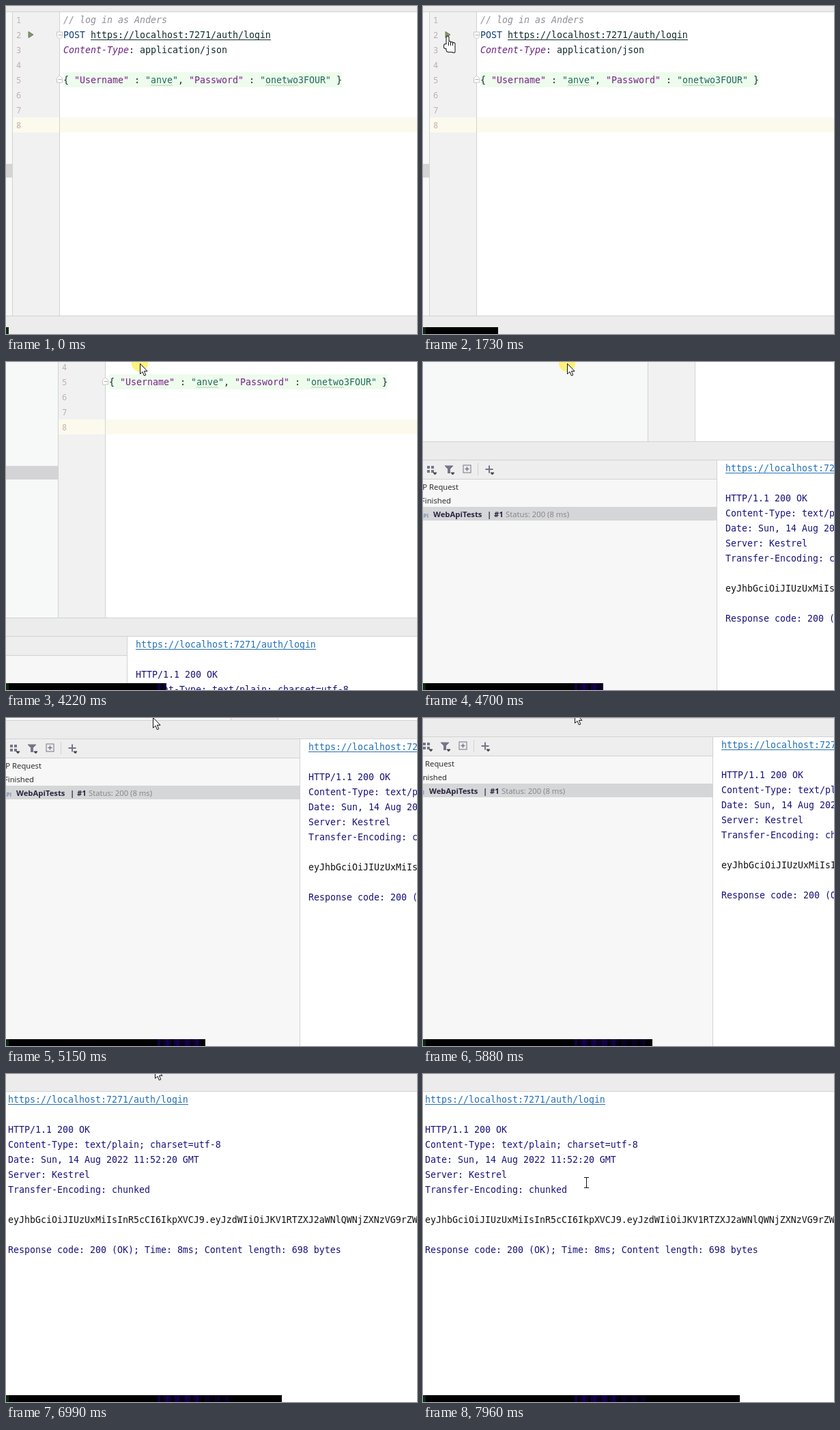
These frames come from a looping animation (602x480 px, 8000 ms). An HTML page with a canvas:

```html
<!DOCTYPE html>
<html lang="en">
<head>
<meta charset="utf-8">
<title>HTTP request</title>
<style>
  html, body { margin: 0; width: 100%; height: 100%; overflow: hidden; background: #fff; }
  canvas { display: block; }
</style>
</head>
<body>
<canvas id="stage" width="602" height="480"></canvas>
<script>
const ctx = document.getElementById('stage').getContext('2d');
const W = 602, H = 480, LOOP = 8000;

// Scene layout; the view pans over it
const LEFT = -700, WIDE = 1900, ROW = 22, CHAR = 8;
const GUTTER = 9, CODE = 78, TEXT = 84;
const BAR = 453, PANEL = 480, TOOLS = 28, SPLIT = 110, RESPONSE = 123;

const MONO = '13.29px "DejaVu Sans Mono", "Noto Sans Mono", monospace';
const ITALIC = 'italic ' + MONO;
const UI = '11.3px "Open Sans", "Noto Sans", sans-serif';
const NAVY = '#17127a', PURPLE = '#7a1f8c', GREEN = '#1f6a5a', DARK = '#122b2b', LINK = '#2470b8';
const EDGE = '#d2d2d2', CHROME = '#ececec', ICON = '#75758a';

const clamp = p => Math.min(1, Math.max(0, p));
const smooth = p => p * p * (3 - 2 * p);
const easeOut = p => Math.sin(p * Math.PI / 2);
const progress = (t, start, duration) => clamp((t - start) / duration);
const rowY = n => n * ROW - 2;

function rect(x, y, w, h, color) {
  ctx.fillStyle = color;
  ctx.fillRect(x, y, w, h);
}

function text(str, x, middle, color, font = MONO, align = 'left') {
  ctx.font = font;
  ctx.textAlign = align;
  ctx.fillStyle = color;
  ctx.fillText(str, x, middle + 5);
}

// Consecutive coloured pieces on the character grid
function pieces(x, middle, ...parts) {
  for (const [str, color, font] of parts) {
    text(str, x, middle, color, font);
    x += str.length * CHAR;
  }
}

function underlined(str, x, middle, color) {
  text(str, x, middle, color);
  rect(x, middle + 7, str.length * CHAR, 1, color);
}

function polygon(points, fill, stroke = fill) {
  ctx.beginPath();
  for (const [x, y] of points) ctx.lineTo(x, y);
  ctx.closePath();
  ctx.fillStyle = fill;
  ctx.fill();
  ctx.strokeStyle = stroke;
  ctx.lineWidth = 1;
  ctx.stroke();
}

function plus(x, y, size, thick) {
  rect(x - size / 2, y - thick / 2, size, thick, ICON);
  rect(x - thick / 2, y - size / 2, thick, size, ICON);
}

function wave(x, y, width) {
  ctx.beginPath();
  for (let i = 0; i <= width; i++) ctx.lineTo(x + i, y + Math.cos(i * Math.PI / 2));
  ctx.strokeStyle = '#a9cfa4';
  ctx.lineWidth = 0.9;
  ctx.stroke();
}

function foldMark(y, dir) {
  const x = CODE + 0.5, flat = y - 4.5 * dir, bend = y + 2 * dir;
  polygon([[x - 4, flat], [x + 4, flat], [x + 4, bend], [x, y + 6 * dir], [x - 4, bend]], '#fff', '#c4c4c4');
  rect(x - 2, y - 0.5, 5, 1, '#aaa');
}

function drawEditor() {
  rect(LEFT, 8, GUTTER - LEFT, BAR, '#f7f8f8');
  rect(LEFT, 231, GUTTER - LEFT, 20, '#d4d4d7');
  rect(GUTTER, 8, CODE - GUTTER, BAR, '#f1f1f1');
  rect(GUTTER, rowY(8) - 11, WIDE, ROW, '#fcfaed');
  rect(TEXT, rowY(5) - 11, 51 * CHAR, ROW, '#edfcec');
  rect(GUTTER, 8, 1, BAR, EDGE);
  rect(CODE, 8, 1, BAR, EDGE);
  rect(LEFT, -100, WIDE, 108, CHROME);
  rect(LEFT, 8, WIDE, 1, EDGE);

  for (let n = 1; n <= 8; n++) text(n, 15, rowY(n), '#c0abb0', '12px "Noto Sans Mono", monospace');
  polygon([[33, 37.5], [40, 42], [33, 46.5]], '#7f9668', '#6d805c');
  foldMark(rowY(2) + 0.5, 1);
  foldMark(rowY(5) - 0.5, -1);

  text('// log in as Anders', TEXT, rowY(1), '#8f8f98', ITALIC);
  text('POST', TEXT, rowY(2), '#123f78');
  underlined('https://localhost:7271/auth/login', TEXT + 5 * CHAR, rowY(2), DARK);
  pieces(TEXT, rowY(3), ['Content-Type', '#6b2380', ITALIC], [': application/json', DARK]);
  pieces(TEXT, rowY(5), ['{ ', DARK], ['"Username"', PURPLE], [' : ', DARK], ['"anve"', GREEN], [', ', DARK],
    ['"Password"', PURPLE], [' : ', DARK], ['"onetwo3FOUR"', GREEN], [' }', DARK]);
  wave(TEXT + 16 * CHAR, rowY(5) + 8, 4 * CHAR);
  wave(TEXT + 37 * CHAR, rowY(5) + 8, 6 * CHAR);
}

// Icons: grid, funnel, framed plus, plus
function drawToolbar(x, y) {
  for (const dx of [-6, 0]) for (const dy of [-5, 1]) rect(x + dx, y + dy, 4, 4, ICON);
  polygon([[x + 20, y - 5], [x + 32, y - 5], [x + 26, y + 1]], ICON);
  rect(x + 24, y, 4, 6, ICON);
  ctx.strokeStyle = ICON;
  ctx.strokeRect(x + 47, y - 6, 11, 11);
  plus(x + 52.5, y - 0.5, 6, 1.5);
  rect(x + 68, y - 9, 1, 18, EDGE);
  plus(x + 85, y, 11, 2);
  for (const dx of [3, 29, 87]) polygon([[x + dx, y + 5], [x + dx + 5, y + 5], [x + dx + 2.5, y + 8]], '#444');
}

function drawTree() {
  const width = SPLIT - LEFT, body = PANEL + TOOLS, status = 559, bold = 'bold ' + UI;
  rect(LEFT, PANEL, width, TOOLS, '#eeeeee');
  rect(LEFT, body, width, H, '#f7f7f7');
  rect(LEFT, body, width, 1, EDGE);
  rect(LEFT, status - 10, width, 20, '#d5d6d7');
  rect(SPLIT, PANEL, 1, H, EDGE);
  drawToolbar(-308, 494);
  text('HTTP Request', -268, status - 40, '#222', UI, 'right');
  text('Finished', -279, status - 20, '#222', UI, 'right');
  text('API', -325, status + 1, '#7c91bd', 'bold 8px "Open Sans", sans-serif');
  text('WebApiTests', -305, status, '#2b2340', bold);
  text('|', -226, status, '#2b2340', bold);
  text('#1', -216, status, '#2b2340', bold);
  text('Status: 200 (8 ms)', -199, status, '#828088', UI);
}

function drawResponse() {
  const rows = [
    'HTTP/1.1 200 OK',
    'Content-Type: text/plain; charset=utf-8',
    'Date: Sun, 14 Aug 2022 11:52:20 GMT',
    'Server: Kestrel',
    'Transfer-Encoding: chunked',
    '',
    'eyJhbGciOiJIUzUxMiIsInR5cCI6IkpXVCJ9.eyJzdWIiOiJKV1RTZXJ2aWNlQWNjZXNzVG9rZW4iLCJq',
    '',
    'Response code: 200 (OK); Time: 8ms; Content length: 698 bytes'
  ];
  const top = PANEL + 12;
  rect(LEFT, BAR, WIDE, PANEL - BAR, CHROME);
  rect(LEFT, BAR, WIDE, 1, EDGE);
  rect(LEFT, PANEL, WIDE, 1, EDGE);
  underlined('https://localhost:7271/auth/login', RESPONSE, top, LINK);
  rows.forEach((row, i) => text(row, RESPONSE, top + (i + 2) * ROW, row.startsWith('ey') ? '#111' : NAVY));
}

function drawArrow() {
  polygon([[0.5, 0.5], [0.5, 15.5], [4, 12.3], [6.4, 18], [8.8, 17], [6.4, 11.4], [11, 11.4]], '#fff', '#111');
}

function drawBeam() {
  rect(0, -7, 1, 14, '#111');
  for (const y of [-8, 7]) rect(-3, y, 7, 1, '#111');
}

// Four fingers, thumb and palm: outlined together, then filled
function drawHand() {
  ctx.beginPath();
  for (let i = 0; i < 4; i++) ctx.roundRect(i * 3 - 1.5, i ? 7 + i : 0.5, 3, 14, 1.5);
  ctx.roundRect(-5, 12, 5, 6, 2);
  ctx.roundRect(-1.5, 13, 12, 10, 3);
  ctx.strokeStyle = '#111';
  ctx.lineWidth = 2;
  ctx.stroke();
  ctx.fillStyle = '#fff';
  ctx.fill();
  for (let i = 0; i < 3; i++) rect(i * 3 + 1, 9, 1, 5, '#111');
}

// Key poses: time, x, y
const POSES = [
  [70, 384, 490], [1000, 36, 44], [2500, 36, 44], [3260, 214, 2], [4220, 196, 2],
  [4700, 211, 2], [5880, 222, -8], [7420, 217, -9], [7900, 239, 159]
];

function pointerAt(t) {
  const next = POSES.findIndex(pose => pose[0] > t);
  const [t1, x1, y1] = POSES.at(next);
  const [t0, x0, y0] = next > 0 ? POSES[next - 1] : [t1, x1, y1];
  const p = smooth(progress(t, t0, t1 - t0 || 1));
  return [Math.round(x0 + (x1 - x0) * p), Math.round(y0 + (y1 - y0) * p)];
}

function drawPointer(t) {
  const [x, y] = pointerAt(t);
  const clicking = t > 1850 && t < 2250, dragging = t > 3280 && t < 4900;
  const overRun = x < 46 && y < 58;
  const overText = y > 25 && x > CODE && y < BAR;
  ctx.save();
  ctx.translate(x, y);
  if (clicking || dragging) {
    ctx.beginPath();
    ctx.arc(0, 0, 12, 0, 7);
    ctx.fillStyle = 'rgba(255, 238, 70, 0.7)';
    ctx.fill();
  }
  if (overRun) drawHand();
  else if (overText) drawBeam();
  else drawArrow();
  ctx.restore();
}

// Grows steadily, resting while the request is pending
function drawProgress(t) {
  const width = Math.round(4 + 0.0611 * (t - 440 * progress(t, 3570, 440)));
  rect(0, 470, width, 10, '#010103');
  rect(0, 470, 4, 10, '#0a2a10');
  for (let x = 222; x < Math.min(width, 326); x += 4) {
    const glow = Math.abs(Math.sin(x)) * (x < 280 ? 1 : 0.5);
    rect(x, 470, Math.min(4, width - x), 10, `rgb(${glow * 22}, 0, ${glow * 75})`);
  }
}

function draw(t) {
  const toTree = progress(t, 4095, 605);
  const toPanel = easeOut(progress(t, 4095, 1135));
  const toResponse = smooth(progress(t, 5822, 834));
  rect(0, 0, W, H, '#fff');
  ctx.save();
  ctx.translate(Math.round(320 * toTree - 440 * toResponse), Math.round(-453 * toPanel - 2 * toResponse));
  drawEditor();
  drawTree();
  drawResponse();
  ctx.restore();
  drawPointer(t);
  drawProgress(t);
}

const start = performance.now();
function frame() {
  draw((performance.now() - start) % LOOP);
  requestAnimationFrame(frame);
}
frame();
</script>
</body>
</html>
```
